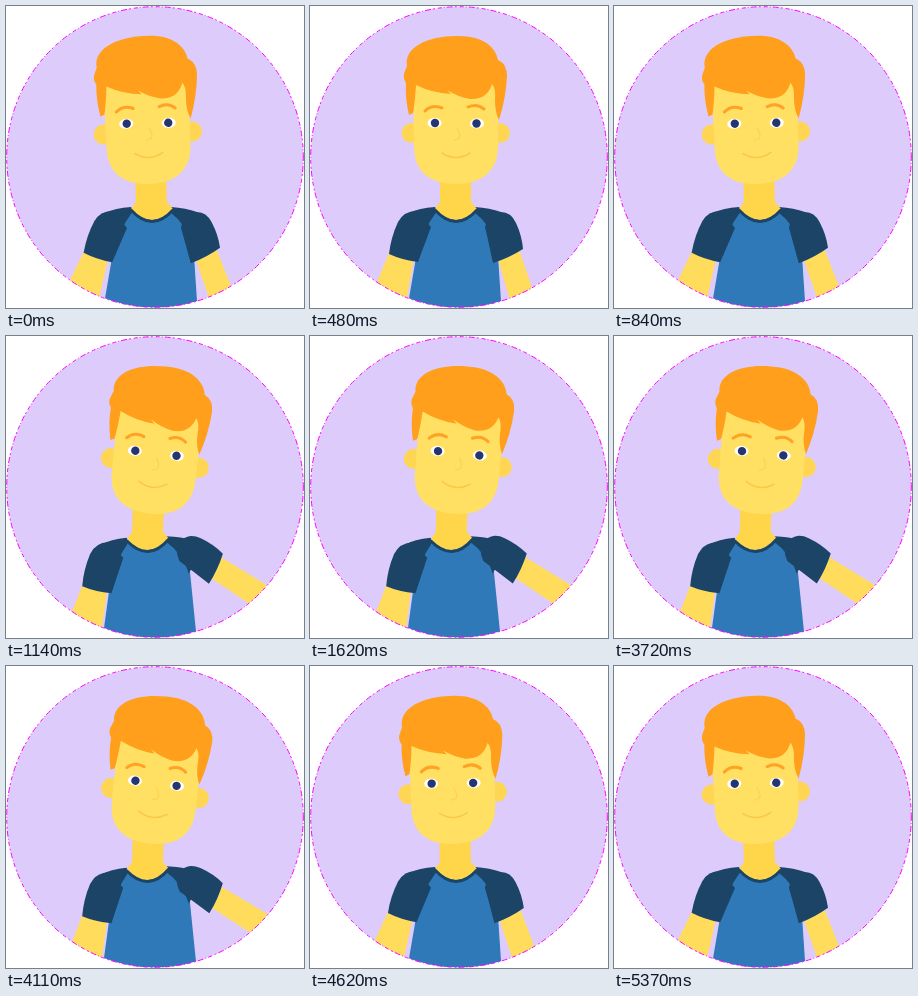
Write an HTML page that moves like this. It is 298 px wide and 302 px high and loops after 5400 ms.

```html
<!DOCTYPE html>
<html>
<head>
<meta charset="utf-8">
<style>
html, body { margin: 0; width: 100%; height: 100%; overflow: hidden; background: #fff; }
svg { display: block; width: 298px; height: 302px; }
.skin { fill: #ffdc5c; }
.neck { fill: #ffd54a; }
.ear { fill: #ffd654; }
.face { fill: #ffe062; }
.navy { fill: #1b4467; }
.line { fill: none; stroke-linecap: round; }
</style>
</head>
<body>
<svg viewBox="0 0 298 302">
  <clipPath id="disc"><ellipse cx="149" cy="151" rx="148.3" ry="150.3"/></clipPath>
  <g clip-path="url(#disc)">
    <rect width="298" height="302" fill="#dccbfb"/>
    <g id="body">
      <path class="skin left" d="M82 240L105 246L92 320L52 312Z"/>
      <path class="skin right" d="M186 246L208 240L232 312L208 322Z"/>
      <path fill="#2f79b8" d="M122 203H168L187 235L192 310H96L108 240Z"/>
      <path class="navy left" d="M88 216Q94 205 106 205L121 221L108 256Q92 254 79 248Q81 231 88 216Z"/>
      <path class="navy right" d="M175 221Q179 206 191 206Q201 206 206 217Q212 230 213 243Q199 252 183 257L178 234Z"/>
      <path class="navy" d="M125 201Q109 202 99 207L95 225L109 250Q111 226 127 205Z"/>
      <path class="navy" d="M165 201Q180 202 191 206L196 222L186 239Q181 219 164 206Z"/>
      <path id="neck" class="neck" d="M130 160H161V207H130Z"/>
      <path class="neck" d="M130 196H161L167 203Q146 225 125 203Z"/>
      <path class="line" d="M125 204Q146 227 167 204" stroke="#1b4467" stroke-width="3"/>
    </g>
    <g id="head">
      <circle class="ear" cx="101.5" cy="127" r="10"/>
      <circle class="ear" cx="190" cy="127" r="10"/>
      <path class="face" d="M103 70H188V140C188 166 171 178 146 178C120 178 104 166 104 140Z"/>
      <path fill="#ff9f1c" d="M99 109Q95 92 96 77Q92 71 95 65L97 60C94 41 118 30 146 30C172 29 186 41 188 54Q197 58 197 70Q196 92 189 114Q185 106 185 95Q186 82 182 78Q177 94 160 93Q148 91 137 84L141 88Q122 87 106 79Q105 96 103 107Z"/>
      <path class="line" d="M115 105Q122 98 132 102M158 101Q167 97 174 103" stroke="#ffa226" stroke-width="3"/>
      <g fill="#fff">
        <ellipse cx="124.5" cy="117" rx="7" ry="5"/>
        <ellipse cx="167" cy="117.5" rx="7" ry="5"/>
      </g>
      <g fill="#25356f">
        <circle cx="125" cy="117" r="4.2"/>
        <circle cx="166.5" cy="117.5" r="4.2"/>
      </g>
      <path class="line" d="M147 122Q152 131 148 133L144 134" stroke="#ffd450" stroke-width="1.5"/>
      <path class="line" d="M132 147Q146 156 160 147" stroke="#fdc848" stroke-width="1.6"/>
    </g>
  </g>
  <ellipse cx="149" cy="151" rx="148.3" ry="150.3" fill="none" stroke="#f0f" stroke-width="1" stroke-dasharray="4 2 1 2 6 2 2 3"/>
</svg>
<script>
// Pose: head shift, head tilt, body lean, left arm angle, right arm angle, right arm lift
const rest = [0, 0, 0, 0, 0, 0];
const back = [-4, -2, 0, 3, -3, 0];
const over = [3.5, 6.5, -2, 0, -39, -5];
const lean = [2.2, 5.3, -2, 0, -38, -5];
const keys = [[0, back], [180, rest], [480, rest], [870, back], [1170, over], [1680, lean], [2700, lean]];
const STEP = 30, FRAMES = 180;

const turn = (sel, angle, x, y, dx = 0, dy = 0) => {
  for (const el of document.querySelectorAll(sel))
    el.setAttribute('transform', `translate(${dx} ${dy}) rotate(${angle} ${x} ${y})`);
};

function poseAt(t) {
  const i = keys.findIndex(k => t < k[0]);
  const [t0, a] = keys[i - 1], [t1, b] = keys[i];
  const e = (1 - Math.cos(Math.PI * (t - t0) / (t1 - t0))) / 2;
  return a.map((v, n) => v + (b[n] - v) * e);
}

function draw(now) {
  // The second half plays the first half backwards
  const n = Math.floor(now / STEP) % FRAMES;
  const [dx, tilt, bend, left, right, lift] = poseAt(Math.min(n, FRAMES - 1 - n) * STEP);
  turn('#head', tilt, 146, 125, dx);
  turn('#neck', tilt * 0.6, 146, 205);
  turn('#body', bend, 144, 330);
  turn('.left', left, 104, 221);
  turn('.right', right, 191, 223, 0, lift);
}

const start = performance.now();
function loop() {
  draw(performance.now() - start);
  requestAnimationFrame(loop);
}
loop();
</script>
</body>
</html>
```
